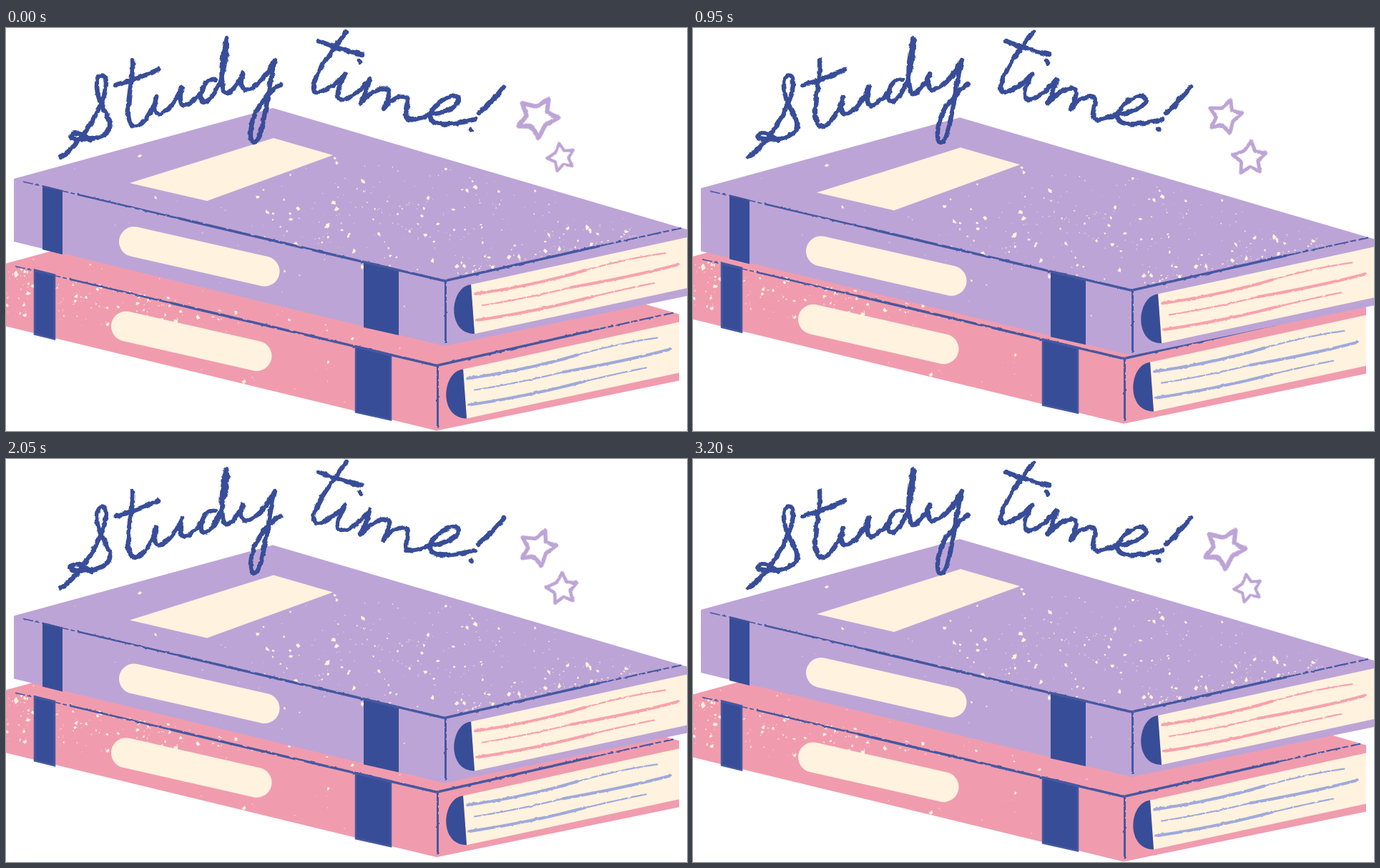
These frames come from a looping animation (952 px wide and 564 px high, 3250 ms). An HTML page:

```html
<!DOCTYPE html>
<html lang="en">
<head>
<meta charset="utf-8">
<title>Study time!</title>
<style>
html, body { margin: 0; width: 100%; height: 100%; overflow: hidden; background: #fff }
svg { display: block; width: 952px; height: 564px }
.cream { fill: #fff2de }
.navy { fill: #384d98 }
.band { stroke: #4558a1; stroke-width: var(--trim) }
.line { fill: none; stroke: #4558a1; stroke-width: 3.5 }
.ruled { fill: none; stroke: var(--rule); stroke-linecap: round }
#lettering { fill: none; stroke: #384d98; stroke-width: 6.5; stroke-linecap: round; stroke-linejoin: round }
.star { fill: #fff; stroke: #bda4d6; stroke-width: 5; stroke-linejoin: round }
</style>
</head>
<body>
<svg viewBox="0 0 952 564">
  <defs>
    <filter id="rough" filterUnits="userSpaceOnUse" x="-20" y="-20" width="1000" height="620" color-interpolation-filters="sRGB">
      <feTurbulence type="fractalNoise" baseFrequency=".14" numOctaves="2" seed="4"/>
      <feDisplacementMap in="SourceGraphic" scale="2.5" xChannelSelector="R" yChannelSelector="G"/>
    </filter>
    <filter id="boil" filterUnits="userSpaceOnUse" x="0" y="0" width="952" height="260" color-interpolation-filters="sRGB">
      <feTurbulence id="noise" type="fractalNoise" baseFrequency=".11" numOctaves="2" seed="1"/>
      <feDisplacementMap in="SourceGraphic" scale="5" xChannelSelector="R" yChannelSelector="G"/>
    </filter>
    <clipPath id="cover"><path d="M11 211L373 112L952 282V375L613 445L11 299Z"/></clipPath>
    <path id="shell" d="M11 211L373 112L952 282V375L613 445L11 299Z" fill="currentColor"/>
    <g id="details">
      <path class="navy band" d="M51 220L79 227V317L51 310ZM500 327L549 339V430L500 419Z"/>
      <path d="M179 299L361.5 340.5" stroke="#fff2de" stroke-width="42" stroke-linecap="round"/>
      <path class="cream" d="M650 359L952 293V364L655 428Z"/>
      <path class="navy" d="M650 359C620 362 615 428 655 428Z"/>
      <g filter="url(#rough)">
        <g class="ruled">
          <path stroke-width="4" d="M656 372Q740 360 810 339M790 363Q880 347 940 331M658 409Q740 397 820 376"/>
          <path stroke-width="2.2" stroke-dasharray="18 2 9 3" d="M810 339Q870 322 922 315M666 388Q720 380 790 363M820 376Q870 364 906 357"/>
        </g>
        <g class="line">
          <path d="M240 266L613 354L830 305"/>
          <path stroke-width="3" d="M614.5 354V441"/>
          <path stroke-width="2.5" d="M100 233L240 266"/>
          <path stroke-width="1.6" stroke-dasharray="14 3 6 4 22 2" d="M24 215L104 234"/>
          <path stroke-width="2.2" stroke-dasharray="20 2 9 3" d="M830 305L944 280"/>
        </g>
      </g>
    </g>
  </defs>

  <g id="lower" color="#f09cae" style="--rule:#9fa9da;--trim:2.5px">
    <use href="#shell"/>
    <g clip-path="url(#cover)"><path id="lowerSpecks" class="cream"/></g>
    <use href="#details"/>
  </g>
  <g id="upper" color="#bda4d6" style="--rule:#f7a2ad;--trim:0">
    <use href="#shell"/>
    <g clip-path="url(#cover)"><path id="upperSpecks" class="cream"/></g>
    <path class="cream" d="M173 217L374 154L457 178L281 242Z"/>
    <use href="#details"/>
  </g>

  <g id="lettering" filter="url(#boil)" role="img" aria-label="Study time!">
    <!-- Study -->
    <path d="M77 181C95 168 108 152 122 128C134 106 143 84 139 70C136 63 127 67 127 79C126 98 138 114 144 128C150 146 134 154 114 156C98 158 86 154 92 149C99 144 108 150 119 157"/>
    <path d="M177 45C179 68 169 98 171 122C173 145 188 140 199 122Q206 110 210 96M153 80Q184 72 213 58"/>
    <path d="M210 96C206 114 208 123 217 120C229 115 239 98 246 83C241 104 245 112 254 107C264 101 269 95 275 88"/>
    <path d="M292 72C279 70 269 90 274 102C284 109 299 82 304 58C308 40 310 24 308 14C301 44 300 70 304 88C309 98 321 84 331 65"/>
    <path d="M331 64C325 83 332 91 343 84C356 77 367 62 376 45C369 68 368 92 362 118C358 141 354 161 346 160C338 155 343 128 352 113C361 98 371 87 384 79"/>
    <!-- time! -->
    <path d="M476 5C466 20 447 40 436 64C425 87 430 94 443 88C455 82 466 75 474 65M437 18Q466 30 498 37"/>
    <path d="M474 65C464 83 460 97 468 100C480 101 495 88 508 72M494 46L495 48"/>
    <path d="M508 72Q504 91 496 105C510 90 525 81 534 86C539 92 532 103 528 113C540 98 554 92 561 98C565 106 555 121 561 127C568 131 580 126 591 121"/>
    <path d="M591 121C612 120 638 108 632 97C621 89 596 108 593 122C592 139 622 136 656 128"/>
    <path d="M696 82Q681 102 661 119M650 142L651 143"/>
  </g>
  <path id="bigStar" class="star" filter="url(#rough)"/>
  <path id="smallStar" class="star" filter="url(#rough)"/>
</svg>
<script>
const $ = id => document.getElementById(id);
const LOOP = 3250, STEP = 50;

function random(seed) {
  return () => (seed = seed * 16807 % 2147483647) / 2147483647;
}

// Scatter small irregular chips; place() returns the centre of each.
function specks(id, count, seed, place) {
  const rnd = random(seed);
  let d = '';
  for (let i = 0; i < count; i++) {
    const [x, y] = place(rnd);
    const size = .7 + 3.2 * rnd() ** 4, turn = rnd() * 6.283;
    const points = [0, 1.2, 3.1, 4.6].map(a => {
      const r = size * (.4 + 1.1 * rnd());
      return (x + r * Math.cos(a + turn)).toFixed(1) + ' ' + (y + r * Math.sin(a + turn)).toFixed(1);
    });
    d += 'M' + points.join('L') + 'Z';
  }
  $(id).setAttribute('d', d);
}

const bell = rnd => rnd() + rnd() + rnd() - 1.5;

specks('upperSpecks', 340, 77, rnd => {
  const kind = rnd();
  if (kind < .16) return [20 + 590 * rnd(), 150 + 260 * rnd()];
  if (kind < .36) {
    const x = 630 + 250 * rnd();
    return [x, 350 - (x - 613) * .223 - 40 * rnd() ** 2];
  }
  return [560 + 210 * bell(rnd), 266 + 75 * bell(rnd)];
});

specks('lowerSpecks', 230, 913, rnd => {
  if (rnd() < .35) return [20 + 570 * rnd(), 205 + 220 * rnd()];
  const x = 12 + 330 * rnd() ** 1.3;
  return [x, 212 + x * .2 + 65 * rnd() ** 1.3];
});

function starPath(angles) {
  const at = (deg, r) => {
    const a = deg * Math.PI / 180;
    return (r * Math.cos(a)).toFixed(1) + ' ' + (r * Math.sin(a)).toFixed(1);
  };
  return 'M' + angles.map((a, i) => {
    const next = i < 4 ? angles[i + 1] : angles[0] + 360;
    return at(a, 24) + 'L' + at((a + next) / 2, 12.5);
  }).join('L') + 'Z';
}
$('bigStar').setAttribute('d', starPath([-72, -13, 74, 141, 209]));
$('smallStar').setAttribute('d', starPath([-83, -16, 53, 121, 191]));
// The filter region is in local units, so it must reach left of and above the centre.
for (const side of ['x', 'y']) $('rough').setAttribute(side, -40);

const settle = ms => 1 - Math.exp(-((Math.max(ms, 0) / 537) ** 1.86));
const move = (id, value) => $(id).setAttribute('transform', value);

let last = -1;
function draw(now) {
  const step = Math.floor(now % LOOP / STEP);
  if (step !== last) {
    last = step;
    const t = step * STEP;
    // The stack closes, then opens again.
    const k = settle(t + 20) - settle(t - 1680);
    move('upper', `translate(0 ${14 * k})`);
    move('lower', `translate(-11 ${118.5 - 10.3 * k})`);
    move('bigStar', `translate(${743 + k} ${125 - k}) rotate(${14 * (1 - k)}) scale(${1.22 - .22 * k})`);
    move('smallStar', `translate(${776 + 2 * k} ${181 + k}) rotate(${15 * (k - 1)}) scale(${.82 + .18 * k})`);
    $('noise').setAttribute('seed', 1 + step % 5);
  }
  requestAnimationFrame(draw);
}
draw(0);
</script>
</body>
</html>
```
